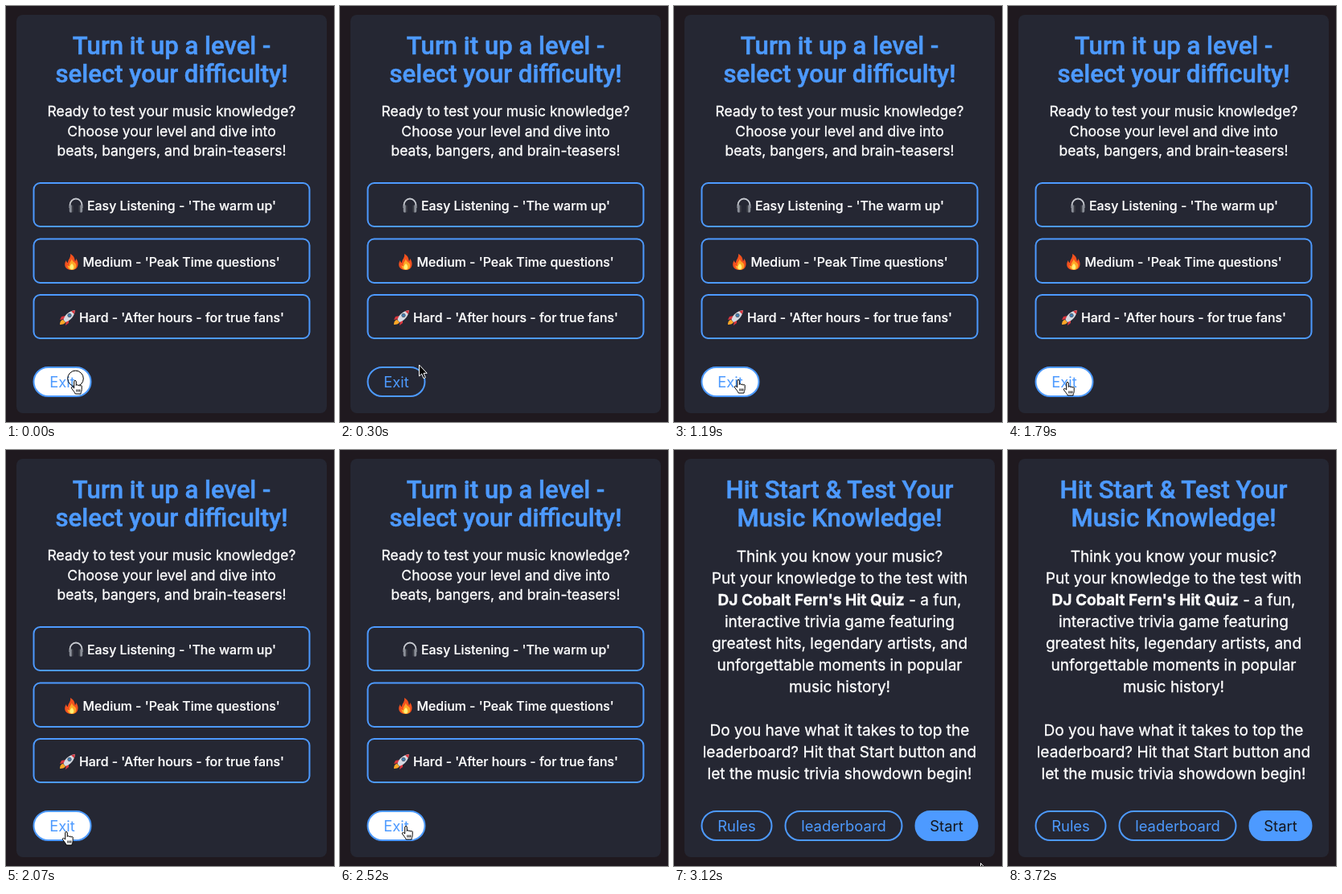
Recreate the animation shown at these times as an HTML page. Size 408x517 px, loop 4.62 s.

```html
<!DOCTYPE html>
<html lang="en">
<head>
<meta charset="utf-8">
<title>Music quiz</title>
<style>
  html, body { margin: 0; height: 100%; overflow: hidden; background: #1f191f; }
  svg { display: block; width: 100%; height: 100%; }
  text { font-family: Inter, sans-serif; fill: #fff; text-anchor: middle; }
  .title text { font: 500 31.1px Roboto, sans-serif; fill: #4d9aff; stroke: #4d9aff; stroke-width: .5; }
  .lead text, .intro text { stroke: #fff; stroke-width: .3; }
  .lead text { font-size: 17.5px; }
  .intro text { font-size: 19.1px; }
  .intro .bold { font-weight: 700; }
  .option text { font-size: 15.9px; font-weight: 500; text-anchor: start; stroke: #fff; stroke-width: .2; }
  .frame { fill: none; stroke: #4d9aff; stroke-width: 2; }
  .pill text { font-size: 18.4px; fill: #4d9aff; }
  .pill.hover .frame { fill: #fff; }
  .pill.solid .frame { fill: #4d9aff; }
  .pill.solid text { fill: #15161c; }
</style>
</head>
<body>
<svg viewBox="0 0 408 517">
  <defs>
    <g id="headphones" fill="none">
      <path d="M2.5 13V9.5a7.5 8 0 0 1 15 0V13" stroke="#c9ccd2" stroke-width="1.8"/>
      <path d="M3.6 11v6M16.4 11v6" stroke="#8b8f98" stroke-width="3.6" stroke-linecap="round"/>
      <path d="M5.7 10.5v7M14.3 10.5v7" stroke="#3b3d45" stroke-width="2" stroke-linecap="round"/>
    </g>
    <g id="flame">
      <path d="M8 0C14 3 13 7 14 9C15 8 15 7 15 6C19 10 19 20 10 20C0 20 0 12 3 8C3 10 4 11 5 11C5 7 9 5 8 0Z" fill="#f4511e"/>
      <path d="M10 6C10 10 14 10 15 13C17 22 4 22 4.5 14C5 15 6 15 7 15C6 11 9 10 10 6Z" fill="#ffa726"/>
      <path d="M10 12C13 15 13 19 10 19.5C6 19 7 15 10 12Z" fill="#fff176"/>
    </g>
    <g id="rocket">
      <path d="M1 19C1 15 3 13 5 13L8 16C7 18 5 19 1 19Z" fill="#ffa726"/>
      <path d="M8 8L3 9L1 13L7 12ZM12 12L12 17L8 20L9 14Z" fill="#d9363e"/>
      <path d="M5.5 13C7 7 12 2 20 1C19 9 14 14 8 16Z" fill="#d5dae2"/>
      <path d="M15 2.3L20 1L18.8 6Z" fill="#d9363e"/>
      <circle cx="13" cy="7.5" r="2.2" fill="#3f7fb5" stroke="#59616e"/>
    </g>
  </defs>
  <rect width="408" height="517" fill="#1f191f"/>
  <rect x="13" y="11" width="386" height="495" rx="8" fill="#252733"/>

  <g id="levels">
    <g class="title">
      <text x="206" y="59.5">Turn it up a level -</text>
      <text x="206" y="94.5">select your difficulty!</text>
    </g>
    <g class="lead">
      <text x="206" y="137">Ready to test your music knowledge?</text>
      <text x="206" y="161.5">Choose your level and dive into</text>
      <text x="206" y="186">beats, bangers, and brain-teasers!</text>
    </g>
    <g class="option">
      <rect class="frame" x="34.5" y="220" width="343" height="54" rx="8"/>
      <use href="#headphones" x="77" y="238"/>
      <text x="101" y="254">Easy Listening - 'The warm up'</text>
      <rect class="frame" x="34.5" y="289.5" width="343" height="54.5" rx="8"/>
      <use href="#flame" x="72" y="308"/>
      <text x="95.5" y="324">Medium - 'Peak Time questions'</text>
      <rect class="frame" x="34.5" y="359" width="343" height="54" rx="8"/>
      <use href="#rocket" x="66" y="377"/>
      <text x="91" y="393">Hard - 'After hours - for true fans'</text>
    </g>
    <g class="pill">
      <rect class="frame" x="34.5" y="449" width="71" height="36" rx="18"/>
      <text x="70" y="474">Exit</text>
    </g>
  </g>

  <g id="home">
    <g class="title">
      <text x="206" y="59.5">Hit Start &amp; Test Your</text>
      <text x="206" y="94.5">Music Knowledge!</text>
    </g>
    <g class="intro">
      <text x="206" y="138.7">Think you know your music?</text>
      <text x="206" y="165.7">Put your knowledge to the test with</text>
      <text x="206" y="192.7"><tspan class="bold">DJ Cobalt Fern's Hit Quiz</tspan> - a fun,</text>
      <text x="206" y="219.7">interactive trivia game featuring</text>
      <text x="206" y="246.7">greatest hits, legendary artists, and</text>
      <text x="206" y="273.7">unforgettable moments in popular</text>
      <text x="206" y="300.7">music history!</text>
      <text x="206" y="354.7">Do you have what it takes to top the</text>
      <text x="206" y="381.7">leaderboard? Hit that Start button and</text>
      <text x="206" y="408.7">let the music trivia showdown begin!</text>
    </g>
    <g class="pill">
      <rect class="frame" x="34.5" y="449" width="87" height="36" rx="18"/>
      <text x="78" y="474">Rules</text>
    </g>
    <g class="pill">
      <rect class="frame" x="138.5" y="449" width="145" height="36" rx="18"/>
      <text x="211" y="474">leaderboard</text>
    </g>
    <g class="pill solid">
      <rect class="frame" x="300.5" y="449" width="77" height="36" rx="18"/>
      <text x="339" y="474">Start</text>
    </g>
  </g>

  <circle id="ring" r="9.8" fill="none" stroke="#000"/>
  <path id="hand" fill="#fff" stroke="#000" stroke-linejoin="round"
    d="M4.7 10V1.8a1.3 1.3 0 0 1 2.6 0V6.5a1.3 1.3 0 0 1 2.5 .3a1.2 1.2 0 0 1 2.3 .5a1.1 1.1 0 0 1 2.1 .7V11.5C14.2 14 13 15 13 17H6.2C5.7 15 3 12.5 1.5 10C.8 8.6 2.4 7.8 3.4 8.8ZM7.9 11.5v3M9.9 11.5v3M11.8 11.5v3"/>
  <path id="arrow" fill="#000" stroke="#fff" stroke-linejoin="round"
    d="M.5 .5V14.5L3.7 11.6L6 17.2L8.3 16.2L6 10.8H10.2Z"/>
</svg>
<script>
  const LOOP = 4620, HOME_AT = 2820;
  // start time, pointer shape, x, y, mouse pressed
  const steps = [
    [0, 'hand', 80, 465, true],
    [150, 'hand', 80, 465],
    [300, 'arrow', 98, 445.5],
    [440, 'hand', 77, 462],
    [590, 'hand', 76, 464],
    [740, 'hand', 80, 458],
    [890, 'hand', 74, 464],
    [1040, 'hand', 74, 465],
    [1190, 'hand', 74, 464],
    [1790, 'hand', 68, 467],
    [1930, 'hand', 60, 472],
    [2070, 'hand', 69, 474],
    [2220, 'hand', 69, 468],
    [2520, 'hand', 76, 467],
    [2820, 'hand', 76, 467, true],
    [2970, 'hand', 76, 467],
    [3120, 'arrow', 381, 513],
    [3270, 'none'],
    [3420, 'arrow', 385, 515],
    [3570, 'arrow', 371, 515],
    [3720, 'none']
  ];
  const el = id => document.getElementById(id);
  const show = (node, on) => node.style.display = on ? '' : 'none';
  const place = (node, x, y) => node.setAttribute('transform', `translate(${x} ${y})`);

  function draw(now) {
    const t = now % LOOP;
    const [, shape, x = 0, y = 0, pressed] = steps.findLast(step => step[0] <= t);
    show(el('levels'), t < HOME_AT);
    show(el('home'), t >= HOME_AT);
    for (const id of ['levels', 'home'])
      el(id).querySelector('.pill').classList.toggle('hover', shape === 'hand');
    for (const id of ['hand', 'arrow']) {
      show(el(id), shape === id);
      place(el(id), x, y);
    }
    show(el('ring'), pressed);
    place(el('ring'), x + 6.5, y - 2);
    requestAnimationFrame(draw);
  }
  draw(0);
</script>
</body>
</html>
```
